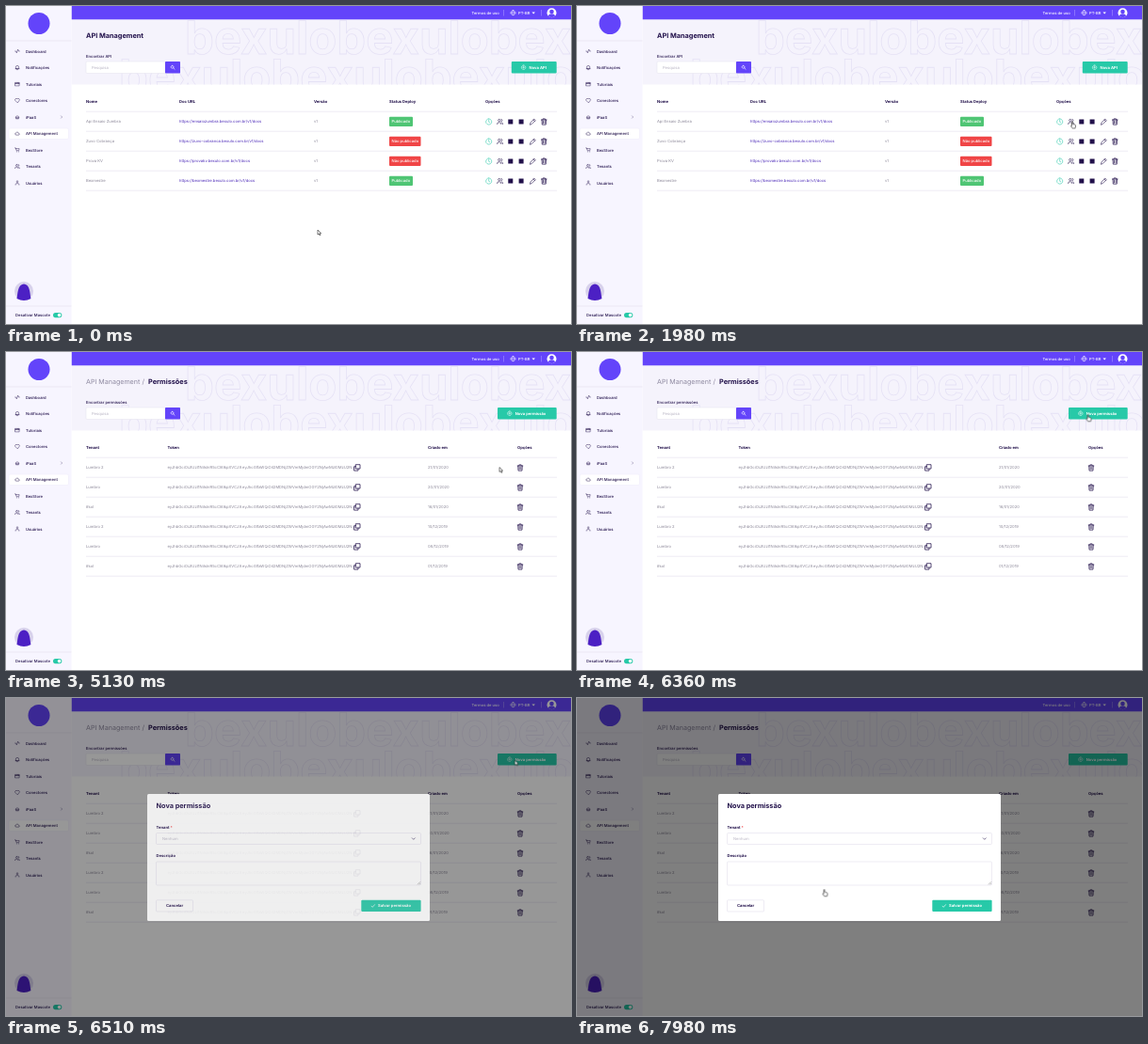
Recreate the animation shown at these times as an HTML page. Size 600 by 338 pixels, loop 8 s.

```html
<!DOCTYPE html>
<html lang="pt-BR">
<head>
<meta charset="utf-8">
<title>API Management</title>
<style>
  html, body { margin: 0; width: 100%; height: 100%; overflow: hidden; background: #fff; }
  svg { display: block; width: 100vw; height: 100vh; }
  text { font: 500 4.15px Inter, "Open Sans", sans-serif; fill: #21104a; text-rendering: geometricPrecision; white-space: pre; }
  .bold { font-weight: 700; }
  .title { font-size: 7.3px; font-weight: 700; }
  .crumb { font-size: 7.1px; font-weight: 400; fill: #8d889f; }
  .soft { font-weight: 400; fill: #8b8798; }
  .hint { font-weight: 400; fill: #b9b5c4; }
  .link { font-weight: 400; fill: #4d2bb8; }
  .white { fill: #fff; }
  .ghost { font-size: 49px; font-weight: 700; fill: none; stroke: #e5e1f5; stroke-width: .8; }
  .icon { fill: none; stroke: #21104a; stroke-width: 2; stroke-linecap: round; stroke-linejoin: round; }

  .anim { animation: 8s linear infinite; }
  #list { animation-name: leave; }
  #grants { animation-name: enter; }
  #shade { animation-name: shade; }
  #modal { animation-name: modal; }
  #cursor { animation-name: travel; }
  #arrow { animation-name: arrow; animation-timing-function: step-end; }
  #hand { animation-name: hand; animation-timing-function: step-end; }

  @keyframes leave { 0%, 34.1% { opacity: 1 } 37.8%, 100% { opacity: 0 } }
  @keyframes enter { 0%, 34.1% { opacity: 0 } 37.8%, 100% { opacity: 1 } }
  @keyframes shade { 0%, 79.6% { opacity: 0 } 80.65% { opacity: .24 } 81.4% { opacity: .41 } 82.3%, 100% { opacity: .5 } }
  @keyframes modal { 0%, 79.6% { opacity: 0 } 80.65% { opacity: .58 } 81.4% { opacity: .86 } 82.3%, 100% { opacity: 1 } }
  @keyframes travel {
    0%, 4.875% { transform: translate(331px, 238px); animation-timing-function: cubic-bezier(.5, 0, .8, .75) }
    14.625% { transform: translate(454px, 165px) }
    16.5% { transform: translate(485px, 146px); animation-timing-function: cubic-bezier(.2, .6, .5, 1) }
    24.75%, 64.125% { transform: translate(524px, 122.5px); animation-timing-function: ease-in-out }
    73.875%, 83.5% { transform: translate(540.5px, 66.3px); animation-timing-function: cubic-bezier(.45, 0, .65, .8) }
    99.75%, 100% { transform: translate(260.5px, 203.3px) }
  }
  @keyframes arrow { 0% { opacity: 1 } 24% { opacity: 0 } 36% { opacity: 1 } 74.2% { opacity: 0 } 80.2% { opacity: 1 } 91%, 100% { opacity: 0 } }
  @keyframes hand { 0% { opacity: 0 } 24% { opacity: 1 } 36% { opacity: 0 } 74.2% { opacity: 1 } 80.2% { opacity: 0 } 91%, 100% { opacity: 1 } }
</style>
</head>
<body>
<svg id="stage" viewBox="0 0 600 338" preserveAspectRatio="none"></svg>
<script>
const PURPLE = '#6344fa', GREEN = '#27c9a8', INK = '#21104a', RULE = '#e3e0ec';

// Icons are drawn on a 24-unit grid centred on (0, 0) once placed.
const ICONS = {
  pulse: 'M2 12h4l3 8 6-16 3 8h4',
  bell: 'M5 17V10a7 7 0 0 1 14 0v7H3h18M10 21h4',
  film: 'M3 5h18v15H3zM3 10h18M8 5l-2 5M14 5l-2 5M20 5l-2 5',
  heart: 'M12 21L3 12a5.5 5.5 0 0 1 9-7 5.5 5.5 0 0 1 9 7z',
  hub: 'M4 15a8 8 0 1 1 16 0zM7 15v5M12 15v6M17 15v5',
  cloud: 'M7 19a5 5 0 0 1 0-10 6 6 0 0 1 11 2 4 4 0 0 1 0 8z',
  cart: 'M1 3h4l3 12h11l2-9H6M9 20h1M18 20h1',
  users: 'M2 21v-2a4 4 0 0 1 4-4h6a4 4 0 0 1 4 4v2M9 3a4 4 0 1 0 .1 0M16 3a4 4 0 0 1 0 8M19 15a4 4 0 0 1 3 4v2',
  user: 'M4 21v-2a4 4 0 0 1 4-4h8a4 4 0 0 1 4 4v2M12 3a4 4 0 1 0 .1 0',
  clock: 'M12 1a11 11 0 1 0 .1 0M12 6v7l4 2',
  pencil: 'M2 22l2-7L17 2l5 5L9 20zM14 5l5 5',
  trash: 'M2 5h20M8 5V1h8v4M4 5l1 18h14l1-18M9 10v8M15 10v8',
  copy: 'M8 1h15v15H8zM8 8H1v15h15v-7',
  plus: 'M12 1a11 11 0 1 0 .1 0M12 7v10M7 12h10',
  search: 'M10 3a7 7 0 1 0 .1 0M15 15l7 7',
  globe: 'M12 1a11 11 0 1 0 .1 0M1 12h22M12 1c-7 7-7 15 0 22c7-7 7-15 0-22',
  right: 'M9 5l7 7-7 7',
  down: 'M4 8l8 8 8-8',
  check: 'M3 13l6 6L21 5'
};

const text = (x, y, s, cls = '') => `<text x="${x}" y="${y + 1.5}" class="${cls}">${s}</text>`;
const rect = (x, y, w, h, fill, r = 0, extra = '') =>
  `<rect x="${x}" y="${y}" width="${w}" height="${h}" rx="${r}" fill="${fill}" ${extra}/>`;
const circle = (x, y, r, fill) => `<circle cx="${x}" cy="${y}" r="${r}" fill="${fill}"/>`;
const icon = (name, x, y, size = 6, color = INK, weight = 2) =>
  `<path class="icon" d="${ICONS[name]}" style="stroke:${color};stroke-width:${weight}"
    transform="translate(${x - size / 2} ${y - size / 2}) scale(${size / 24})"/>`;
const rule = (x1, x2, y) => `<path d="M${x1} ${y}H${x2}" stroke="${RULE}" stroke-width=".6"/>`;
const frame = (x, y, w, h) => rect(x, y, w, h, '#fff', 1, `stroke="${RULE}" stroke-width=".6"`);
const group = (id, body) => `<g id="${id}" class="anim">${body}</g>`;
const rowY = i => 122.7 + 21 * i;

function sidebar() {
  const items = [['pulse', 'Dashboard'], ['bell', 'Notificações'], ['film', 'Tutoriais'],
    ['heart', 'Conectores'], ['hub', 'iPaaS'], ['cloud', 'API Management'],
    ['cart', 'BexStore'], ['users', 'Tenants'], ['user', 'Usuários']];
  return rect(0, 0, 69.5, 338, '#f7f5ff') + rule(0, 69.5, 37) + rule(0, 69.5, 319) +
    circle(35, 18.5, 11.5, PURPLE) +
    rect(3, 130, 63.5, 11.5, '#fff', 1.5, 'stroke="#ece8f8" stroke-width=".5"') +
    items.map(([name, label], i) => {
      const y = 48 + 17.5 * i;
      return icon(name, 12, y, 5.6) + text(21, y, label);
    }).join('') +
    icon('right', 59, 118, 4) +
    circle(19, 303, 10, '#d8d2ec') +
    '<path d="M11.5 311C12.5 307 12 296 19 295.500C26 296 25.500 307 26.500 311Q19 315 11.500 311Z" fill="#4c20c4"/>' +
    text(10, 328.5, 'Desativar Mascote') +
    rect(50, 326, 9.3, 5.2, GREEN, 2.6) + circle(56.6, 328.6, 1.8, '#fff');
}

function header() {
  const word = 'bexulo', line = Array(4).fill(word).join('');
  return rect(69.5, 14, 530.5, 69.5, '#f5f3fc') +
    `<clipPath id="band"><rect x="69.500" y="14" width="530.500" height="69.500"/></clipPath>
     <g clip-path="url(#band)"><text class="ghost" x="190" y="51">${line}</text>
     <text class="ghost" x="120" y="92">${line}</text></g>` +
    rect(69.5, 0, 530.5, 14.3, PURPLE) +
    text(494.5, 7, 'Termos de uso', 'white') +
    '<path d="M528.500 4V10.500M568.500 4V10.500" stroke="#a492ff" stroke-width=".6"/>' +
    icon('globe', 538.5, 7.2, 5.6, '#fff') + text(544, 7.2, 'PT-BR', 'white') +
    '<path d="M558.500 6.500h3.400l-1.700 2z" fill="#fff"/>' +
    circle(579.5, 7.2, 5, '#fff') + circle(579.5, 6, 2.3, PURPLE) +
    `<path d="M575.800 10.500a3.800 3 0 0 1 7.400 0a5 5 0 0 1-7.400 0" fill="${PURPLE}"/>` +
    rect(85, 59, 84, 12.5, '#fff', 1, `stroke="${RULE}" stroke-width=".5"`) +
    text(91, 65.2, 'Pesquisa', 'hint') +
    rect(169, 59, 16, 12.5, PURPLE, .8) + icon('search', 177, 65.2, 5, '#fff', 3.2);
}

const addButton = (x, label) => rect(x, 59, 584.7 - x, 12.5, GREEN, 1) +
  icon('plus', x + 12.8, 65.2, 5, '#fff', 2.4) + text(x + 18.7, 65.2, label, 'bold white');

const heads = list => list.map(([x, s]) => text(x, 101.8, s, 'bold')).join('');
const rules = n => Array.from({ length: n + 1 }, (_, i) => rule(85, 585, 112.2 + 21 * i)).join('');

function listPage() {
  const apis = [['Api Ensaio Zumbra', 'ensaiozumbra', true], ['Zuvo Cobrança', 'zuvo-cobranca', false],
    ['Prova KV', 'provakv', false], ['Bexmestre', 'bexmestre', true]];
  return text(85, 32.7, 'API Management', 'title') + text(85, 53, 'Encontrar API') +
    addButton(536.8, 'Nova API') +
    heads([[85, 'Nome'], [184, 'Doc URL'], [327, 'Versão'], [407, 'Status Deploy'], [509, 'Opções']]) +
    rules(4) + apis.map(([name, host, live], i) => {
      const y = rowY(i);
      return text(85, y, name, 'soft') +
        text(184, y, `https://${host}.bexulo.com.br/v1/docs`, 'link') + text(327, y, 'v1', 'soft') +
        rect(407, y - 5, live ? 25 : 33.5, 10.2, live ? '#4fc574' : '#f04546', 1) +
        text(409.5, y, live ? 'Publicado' : 'Não publicado', 'white') +
        icon('clock', 512.7, y + .3, 6.8, GREEN) + icon('users', 524.6, y + .3, 7) +
        rect(533.3, y - 2.2, 5, 5, INK) + rect(544.6, y - 2.2, 5, 5, INK) +
        icon('pencil', 559.4, y + .3, 7) + icon('trash', 571.3, y + .3, 6.8, INK, 2.6);
    }).join('');
}

function grantsPage() {
  const token = 'eyJhbGciOiJIUzI1NiIsInR5cCI6IkpXVCJ9.eyJhcGlfaWQiOiI2MDNjZWVmMjdmOGY2NjAwMzI0MzU2N...';
  const tenants = ['Lumbro 2', 'Lumbro', '#sol', 'Lumbro 2', 'Lumbro', '#sol'];
  const dates = ['21/01/2020', '20/01/2020', '16/01/2020', '10/12/2019', '08/12/2019', '01/12/2019'];
  return text(85, 32.7, 'API Management', 'crumb') + text(144.5, 32.7, '/', 'crumb') +
    text(151, 32.7, 'Permissões', 'title') + text(85, 53, 'Encontrar permissões') +
    addButton(522, 'Nova permissão') +
    heads([[85, 'Tenant'], [171.5, 'Token'], [448, 'Criado em'], [543, 'Opções']]) +
    rules(6) + tenants.map((name, i) => {
      const y = rowY(i);
      return text(85, y, name, 'soft') + text(171.5, y, token, 'soft') +
        icon('copy', 372.8, y + .2, 7, INK, 2.6) + text(448, y, dates[i], 'soft') +
        icon('trash', 546, y + .3, 6.8, INK, 2.6);
    }).join('');
}

function dialog() {
  return rect(150, 102, 300, 135, '#fff', 1.5) + text(159.5, 115.3, 'Nova permissão', 'title') +
    text(159.5, 137.2, 'Tenant <tspan fill="#f04546">*</tspan>', 'bold') +
    frame(159.5, 143.5, 281, 12) + text(166, 149.4, 'Nenhum', 'hint') + icon('down', 432.8, 149.6, 4.6, INK, 3) +
    text(159.5, 167.6, 'Descrição', 'bold') + frame(159.5, 174, 281, 25) +
    '<path d="M437 198.300l3-3M438.800 198.300l1.200-1.200" stroke="#777" stroke-width=".5"/>' +
    frame(159.5, 214.8, 39, 12.2) + text(170, 220.9, 'Cancelar', 'bold') +
    rect(377.3, 214.8, 63.3, 12.2, GREEN, 1) + icon('check', 389.8, 221, 4.6, '#fff', 3.4) +
    text(395, 220.9, 'Salvar permissão', 'bold white');
}

const outline = 'fill="#fff" stroke="#222" stroke-width=".6" stroke-linejoin="round"';
const pointer =
  `<path id="arrow" class="anim" d="M0 0V5l1.200-1 .8 1.800 .9-.4-.8-1.700h1.500z" ${outline}/>
   <path id="hand" class="anim" d="M1.500 4.800V.9a.6.6 0 0 1 1.200 0v2.200l2.200.5q.8.300.7 1.200l-.5 2.600H2L.3 4.900q.3-.8 1.200-.1z" ${outline}/>`;

document.getElementById('stage').innerHTML =
  rect(0, 0, 600, 338, '#fff') + header() + sidebar() +
  group('list', listPage()) + group('grants', grantsPage()) +
  group('shade', rect(0, 0, 600, 338, '#000')) + group('modal', dialog()) + group('cursor', pointer);
</script>
</body>
</html>
```
